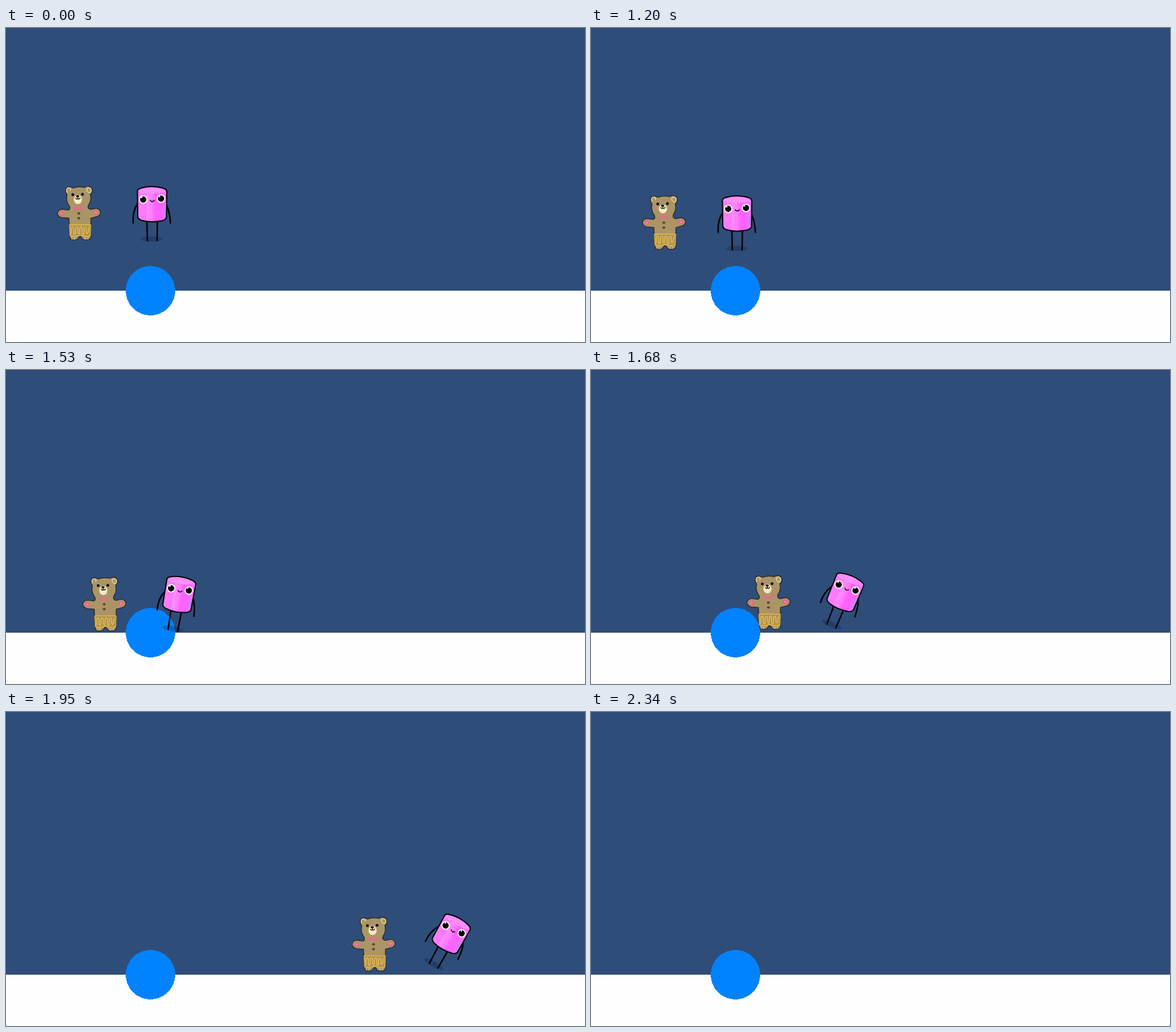
Animation of 958 by 520 pixels, one loop 3210 ms. Source, as an HTML page:

```html
<!DOCTYPE html>
<html lang="en">
<head>
<meta charset="utf-8">
<title>Bear and friend</title>
<style>
html, body { margin: 0; width: 100%; height: 100%; overflow: hidden; background: #2f4d79; }
svg { display: block; width: 958px; height: 520px; }
.line { fill: none; stroke-linecap: round; stroke-linejoin: round; }
</style>
</head>
<body>
<svg viewBox="0 0 958 520">
  <defs>
    <linearGradient id="candy">
      <stop offset="0" stop-color="#ff80fb"/>
      <stop offset=".28" stop-color="#ff78fc"/>
      <stop offset=".34" stop-color="#ff8cfd"/>
      <stop offset=".5" stop-color="#ff7cfc"/>
      <stop offset=".62" stop-color="#ff60ff"/>
      <stop offset=".85" stop-color="#ff66ff"/>
      <stop offset="1" stop-color="#f27bfc"/>
    </linearGradient>
  </defs>
  <rect width="958" height="435" fill="#2f4d79"/>
  <rect y="435" width="958" height="85" fill="#fefefe"/>
  <circle cx="239" cy="435" r="41" fill="#0082ff" shape-rendering="crispEdges"/>

  <g id="bear">
    <path fill="#ab9566" stroke="#2c2a28" stroke-width="1.4" d="M100 264.500C104 261.500 108 264 111 265Q120 261.500 130 264C133 261 140 261.500 142.500 266Q144 272 139.500 275.500Q142 286 136.500 293Q134 299 140 300.500L149 298.500Q156 299.500 156.500 306Q155 312 148 313L140.500 315Q140 330 140.500 345Q140.500 351 133 351Q126.500 352 125 346.500Q122.500 343.500 120 347Q118 352 111 351Q105 350.500 105.500 343L104 315L92 314Q85.500 312 85 306.500Q86.500 300.500 93 300L103 301.500Q107 300 105 295Q98.500 287 101 276Q96.500 270 100 264.500Z"/>
    <g class="line" stroke="#ead9ae" stroke-width="1.300">
      <path d="M101 272Q98.500 265 104 264.500Q109 265 106 269M133.500 267Q136 262.500 140 266Q142.500 271 138 273Q133.500 271 133.500 267"/>
      <path d="M109 350V347M113 350V346.500M131 350V346.500M135.500 350V347" stroke-width=".8"/>
    </g>
    <ellipse cx="119" cy="284" rx="6.800" ry="7.500" fill="#f6e8bf"/>
    <g fill="#14110f">
      <circle cx="110.500" cy="276" r="2.400"/>
      <circle cx="126.500" cy="275.500" r="2.400"/>
      <ellipse cx="118.500" cy="278.700" rx="2.700" ry="1.900"/>
    </g>
    <path class="line" stroke="#14110f" stroke-width="1.300" d="M118.700 280V283M115.500 282Q117.500 284.500 118.700 282.500Q121 284.500 122.500 281.500"/>
    <path class="line" stroke="#f2629a" stroke-width="1.700" d="M119.500 298L113.500 295.500V301L119.500 298L126 295.500V300.500Z"/>
    <g fill="#574529">
      <ellipse cx="120.500" cy="307" rx="2.400" ry="2"/>
      <ellipse cx="120.500" cy="315" rx="2.400" ry="2"/>
    </g>
    <g fill="#ff74ac" stroke="#e0557f">
      <circle cx="92.500" cy="307.300" r="3.200"/>
      <circle cx="148.500" cy="305.800" r="3.200"/>
    </g>
    <path class="line" style="fill:#b0914f" stroke="#e9bd45" stroke-width="1.400" d="M105 326H140L139.500 344Q132 346 126 344Q122 342 118 344.500Q112 346 106 344Z"/>
    <path class="line" stroke="#efc95c" stroke-width="1.200" d="M108 341V331Q111 327 112 332V340Q114 345 115 339V332Q118 327 119 332V338Q121 344 122 338V331Q125 327 126 332V340Q128 345 129 339V332Q132 327 133 332V339Q136 344 137 330"/>
  </g>

  <g id="candyman">
    <ellipse cx="241" cy="349.500" rx="17.500" ry="4.500" fill="#071b42" opacity=".28"/>
    <path class="line" stroke="#050407" stroke-width="2.500" d="M233 320L234 352M250.500 320L250 352M217 292Q209 305 210.500 323M265.500 293Q271.500 306 272 323"/>
    <path fill="url(#candy)" stroke="#050407" stroke-width="2" d="M217.500 271Q217 267.500 222 265.500Q231 262.500 241 262.500Q252 262.500 261 265.500Q266 267.500 266 271L265.500 313Q265 317 259 319Q250 321 241 321Q232 321 224 318.500Q218 316 218 312Z"/>
    <path fill="#ff8dfa" d="M219 270.500Q224 264.500 241 264Q259 264.500 264.500 270.500Q259 274 241 274.500Q224 274 219 270.500Z"/>
    <path class="line" stroke="#b48cf2" stroke-width="3" d="M263 296L262 312"/>
    <g fill="#fff">
      <circle cx="227" cy="284" r="7"/>
      <circle cx="256.500" cy="282.500" r="7"/>
    </g>
    <g fill="#050407">
      <circle cx="227" cy="284" r="5.200"/>
      <circle cx="256.500" cy="282.500" r="5.200"/>
    </g>
    <g fill="#fff">
      <circle cx="224.500" cy="280.500" r="1.300"/>
      <circle cx="254" cy="279" r="1.300"/>
    </g>
    <path class="line" stroke="#050407" stroke-width="1.400" d="M238.500 285.500Q242 289.500 245.500 285.500"/>
  </g>
</svg>
<script>
const LOOP = 3210, EXIT = 2340, STEP = 18, GROUND = 77.8;
const bear = document.getElementById('bear');
const candy = document.getElementById('candyman');

// physics step, distance, speed per step, lean in degrees
const run = [
  [-30, 0, 0, 0],
  [-10, 1, .2, 0],
  [-2, 42, 10, 10],
  [7, 173, 18.5, 22.5],
  [22, 487.5, 21.5, 29],
  [30, 659.3, 21.3, 39],
  [42, 865, 13, 55]
];

function runAt(step) {
  const s = Math.max(-30, Math.min(42, step));
  const i = Math.max(1, run.findIndex(k => k[0] >= s));
  const [s0, x0, v0, a0] = run[i - 1], [s1, x1, v1, a1] = run[i];
  const d = s1 - s0, u = (s - s0) / d, w = 1 - u;
  return {
    x: w * w * ((1 + 2 * u) * x0 + u * d * v0) + u * u * ((3 - 2 * u) * x1 - w * d * v1),
    lean: a0 + (a1 - a0) * u
  };
}

// free fall, then sink slightly into the ground and settle
function fallAt(step) {
  const n = Math.max(0, step + 31);
  return n <= 26 ? .117 * n * (n + 1) : GROUND + 6 * Math.exp((26 - n) / 5);
}

function draw(now) {
  const t = now % LOOP;
  const step = Math.floor((t - 1560) / STEP + .5);
  const { x, lean } = runAt(step), y = fallAt(step);
  bear.style.display = candy.style.display = t < EXIT ? '' : 'none';
  bear.setAttribute('transform', `translate(${x} ${y})`);
  candy.setAttribute('transform', `translate(${x} ${y - lean * .15}) rotate(${lean} 241 307)`);
}

const start = performance.now();
function tick() {
  draw(performance.now() - start);
  requestAnimationFrame(tick);
}
tick();
</script>
</body>
</html>
```
